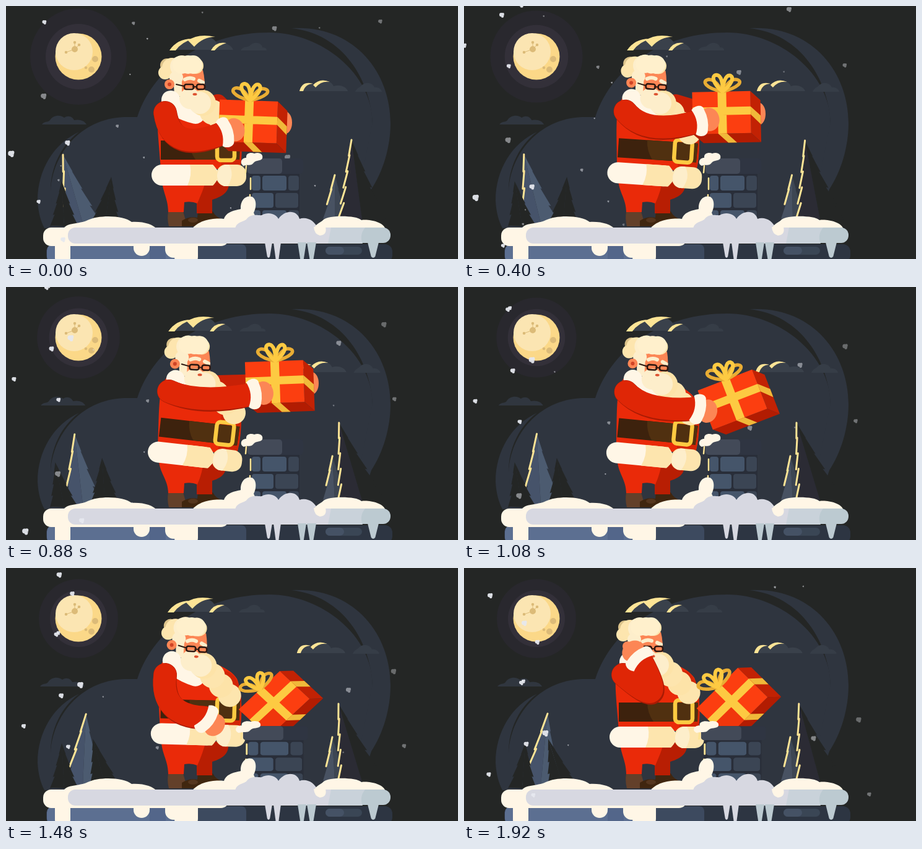
An HTML page with a canvas for the animation above (1960 ms loop, 730 px wide and 410 px high).

```html
<!DOCTYPE html>
<html lang="en">
<head>
<meta charset="utf-8">
<title>Winter rooftop</title>
<style>
html, body { margin: 0; width: 100%; height: 100%; overflow: hidden; background: #242625; }
canvas { display: block; }
</style>
</head>
<body>
<canvas id="stage" width="730" height="410"></canvas>
<script>
const g = document.getElementById('stage').getContext('2d');
const LOOP = 1960, STEP = 40;
const BG = '#242625', HILL = '#2f353f', CREAM = '#fff6e6', HAIR = '#fdeecb', WARM = '#fde5ae', GOLD = '#fdca42',
  RED = '#ea2a09', SLEEVE = '#df2606', DARKRED = '#b81e03', SKIN = '#fc8655', GLOW = '#fde496', ICE = '#d7d8e1';

const lerp = (a, b, u) => a + (b - a) * u;
const part = (t, a, b) => Math.min(1, Math.max(0, (t - a) / (b - a)));
const ramp = (t, a, b) => { const u = part(t, a, b); return u * u * (3 - 2 * u); };

// progress of each phase of the action, 0 to 1
const phases = t => ({
  dip: ramp(t, 0, 200),
  reach: ramp(t, 200, 560),
  wait: ramp(t, 600, 880),
  drop: part(t, 1000, 1120) ** 2,
  lower: ramp(t, 1000, 1240),
  fold: ramp(t, 1240, 1720),
  scratch: ramp(t, 1720, 1920)
});

function fill(d, color) { g.fillStyle = color; g.fill(new Path2D(d)); }
function line(d, color, w) {
  g.strokeStyle = color; g.lineWidth = w; g.lineCap = g.lineJoin = 'round';
  g.stroke(new Path2D(d));
}
function oval(x, y, rx, color, ry = rx) {
  g.fillStyle = color; g.beginPath(); g.ellipse(x, y, rx, ry, 0, 0, 7); g.fill();
}
function box(x, y, w, h, r, color) {
  g.fillStyle = color; g.beginPath(); g.roundRect(x, y, w, h, r); g.fill();
}
function frame(x, y, w, h, r, color, lw) {
  g.strokeStyle = color; g.lineWidth = lw; g.beginPath(); g.roundRect(x, y, w, h, r); g.stroke();
}
function group(draw) { g.save(); draw(); g.restore(); }
function turn(x, y, deg) { g.translate(x, y); g.rotate(deg * Math.PI / 180); g.translate(-x, -y); }

function sky(t) {
  g.fillStyle = BG; g.fillRect(0, 0, 730, 410);
  const halo = 1 - ramp(t, 0, 1240);
  oval(117, 82, 64 + 14 * halo, '#29282e');
  oval(117, 82, 46 + 7 * halo, '#333039');

  fill('M212 180C240 95 325 43 425 43C510 43 592 110 592 190L590 297L570 360H70L72 300C75 240 120 183 190 180Z', HILL);
  fill('M461 36C560 30 621 105 621 190C621 230 608 270 590 297L560 350L592 188C588 120 545 45 461 36Z', HILL);
  fill('M118 204C78 222 51 265 51 315C52 335 56 348 62 360H78L72 300C72 260 90 225 118 204Z', HILL);

  oval(117, 82, 37.5, '#fbd888');
  oval(110, 74, 30, '#fbe5b2');
  const crater = '#dcbb78';
  line('M97 75L111 70L118 63M111 70V59', crater, 1);
  line('M97 75h0M111 59h0M118 63h0M129 100h0', crater, 4.5);
  line('M111 70h0M144 86h0M138 103h0', crater, 10);
}

function clouds(t) {
  const u = t / LOOP;
  group(() => {
    g.translate(-4 * u, 0);
    fill('M58 192C62 186 68 189 71 185C76 176 89 176 94 181C101 176 108 180 110 185C119 183 127 186 130 192Z', '#30363f');
    fill('M268 71C276 58 288 54 299 57C309 46 333 46 340 60C352 57 364 63 367 71Z', '#3a414b');
    fill('M379 72C384 64 390 68 394 64C402 56 414 61 414 67C420 67 421 70 421 72Z', '#363d47');
    fill('M264 72Q277 52 303 53Q284 58 274 72ZM294 56Q310 44 338 50Q318 50 304 66ZM331 72Q339 57 356 60Q344 63 337 72Z', GLOW);
  });
  group(() => {
    g.translate(-5.5 * u, 0);
    fill('M474 138C478 127 488 121 497 127C506 117 525 119 529 130C540 126 551 132 552 138Z', '#3a414b');
    fill('M564 139C567 132 572 132 575 128C584 121 594 127 595 132C602 131 607 136 607 139Z', '#363d47');
    fill('M474 138Q478 121 496 126Q484 126 480 138ZM496 128Q507 116 523 123Q509 121 500 132Z', GLOW);
  });
}

// one jagged edge from the apex down; s is -1 for left, 1 for right
function edge(ax, ay, bx, by, w, n, s) {
  const pts = [[ax, ay]];
  for (let i = 1; i <= n; i++) {
    const u = i / n, c = lerp(ax, bx, u), y = lerp(ay, by, u);
    pts.push([c + s * w * u, y], [c + s * w * u * 0.83, y - 1]);
  }
  return pts;
}
function tree(ax, ay, bx, by, w, n, left, right, lit = 0) {
  const l = edge(ax, ay, bx, by, w, n, -1), r = edge(ax, ay, bx, by, w, n, 1);
  fill('M' + l.join('L') + `L${bx} ${by}Z`, left);
  fill('M' + r.join('L') + `L${bx} ${by}Z`, right);
  for (let i = 0; i < lit; i++) line(`M${l[2 * i]}L${l[2 * i + 1]}`, GLOW, 3);
}
function trees(t) {
  const wind = ramp(t, 0, 1920), gust = ramp(t, 0, 1000);
  tree(92 + 43 * wind, 241 - 5 * wind, 124, 352, 31, 4, '#46536a', '#4c5b70', 3);
  tree(90 - 11 * Math.sin(Math.PI * t / 1480), 284, 94, 357, 23, 4, BG, BG);
  tree(170 - 34 * wind, 277, 160, 353, 25, 4, BG, BG);
  tree(531 - 4 * gust, 274, 531, 345, 19, 3, '#485262', '#3d4653', 2);
  tree(558 - 21 * gust + 4 * ramp(t, 1600, LOOP), 217 + 3 * gust, 575, 346, 39, 5, '#2b2b34', BG, 5);
}

let seed = 11;
const rnd = () => (seed = seed * 16807 % 2147483647) / 2147483647;
// bright flakes drift close by on the left, faint ones fall everywhere
const FLAKES = Array.from({ length: 38 }, (_, i) => {
  const near = i % 3 === 0;
  return {
    near,
    x: near ? 110 * rnd() - 10 : 60 + 550 * rnd(),
    y: 700 * rnd() - 320,
    r: near ? 3 + 2.5 * rnd() : 1.2 + 4 * rnd() ** 2,
    a: near ? 0.95 : 0.35 + 0.3 * rnd()
  };
});
function snow(t, near) {
  for (const f of FLAKES) {
    if (f.near !== near) continue;
    const x = f.x + .026 * t, y = f.y + .178 * t, r = f.r;
    g.globalAlpha = f.a;
    g.fillStyle = '#e6e8ee';
    g.beginPath();
    g.arc(x - r * .2, y - r * .15, r * .75, 0, 7);
    g.arc(x + r * .45, y - r * .45, r * .5, 0, 7);
    g.arc(x + r * .25, y + r * .5, r * .5, 0, 7);
    g.fill();
  }
  g.globalAlpha = 1;
}

function legs(hip) {
  fill('M262 333H286L290 347L288 357H263Q260 345 262 333Z', '#63402a');
  fill('M284 348Q296 340 309 343L310 333H334Q339 343 351 346Q354 352 352 357H284Z', '#40260f');
  oval(302, 347, 8, '#55361e', 4);
  const l = 252 + hip, r = 360 + hip;
  fill(`M${l + 60} 280L308 320V336H333V314C352 308 ${r + 2} 300 ${r} 282Z`, DARKRED);
  fill(`M${l} 280C${l} 300 262 312 262 334H287L288 318Q300 316 309 320Q318 300 ${l + 72} 280Z`, RED);
}

function head() {
  oval(260, 96, 11, '#dcc38b');
  oval(257, 108, 11, WARM);
  oval(268, 100, 16, WARM);
  oval(282, 98, 17, HAIR);
  fill('M274 104H318Q322 120 321 142H278Z', SKIN);
  oval(275, 116, 11, HAIR);
  fill('M270 112H284V146H272Z', HAIR);
  oval(264, 127, 8, SKIN);
  oval(264, 127, 3, '#cf4426');
  oval(306, 97, 13, WARM);
  for (const x of [284, 294, 302]) oval(x, 95, 15, '#fff0cc');
}
function beard() {
  line('M266 152Q274 168 306 176', CREAM, 30);
  for (let i = 3; i >= 0; i--) oval(318 + 15 * i, 157 + 15 * i, 21 - .8 * i, i % 2 ? WARM : '#fde3a8');
  oval(297, 150, 17, HAIR);
  oval(313, 157, 18, HAIR);
  oval(305, 143, 3.5, '#dd5331', 2);
  line('M289 119Q296 115 303 118M312 121L318 124', HAIR, 6);
  line('M275 127L288 130M302 131H307', '#2c1811', 2);
  frame(288, 127, 15, 8, 3, '#2c1811', 2.6);
  frame(308, 127, 13, 8, 3, '#2c1811', 2.6);
}

function body(p, gift) {
  const dx = -5 * p.reach + 3 * p.lower + 2 * p.fold;
  const tilt = 6.5 * p.reach - 3.5 * p.lower - 3 * p.fold;
  const nod = -4 * p.wait + 9 * p.lower - 5 * p.fold;
  legs(dx);
  group(() => {
    g.translate(dx, 0);
    turn(308, 262, tilt);
    fill('M256 148C238 162 246 205 250 264H378C383 240 381 200 372 178C360 160 330 150 300 148Z', RED);
    fill('M345 168C364 160 376 182 379 205C381 230 380 245 378 264H348Z', '#d22506');
    g.translate(0, 8 * (p.scratch - p.fold));
    fill('M250 218H378L377 249H250Z', '#3d220d');
    fill('M296 218H378L377 249H306Q296 235 296 218Z', '#503010');
    frame(341, 214, 28, 36, 6, GOLD, 6.5);
    box(235, 257, 108, 34, 17, CREAM);
    fill('M297 257H334C344 266 344 283 334 291H293Q301 274 297 257Z', WARM);
    box(340, 257, 48, 35, 15, WARM);
    fill('M354 257H360Q370 273 358 292H352C337 286 337 263 354 257Z', HAIR);
  });
  if (p.drop < .1) {
    line(`M342 158L${gift.x - 18} ${gift.y + 2}`, '#c82106', 30);
    oval(gift.x + 60, gift.y + 2, 11, SKIN, 18);
  }
  group(() => {
    g.translate(dx, 0);
    turn(308, 262, tilt);
    turn(290, 150, nod);
    head();
    beard();
  });
}

function bow() {
  line('M0 0C-28 -6 -34 -18 -22 -20C-12 -20 -6 -10 0 0C6 -10 14 -22 24 -19C34 -16 26 -6 0 0', '#e9ad34', 5.5);
  line('M0 0C-16 -14 -18 -27 -9 -27C-1 -26 1 -12 0 0C1 -12 5 -28 13 -26C20 -22 14 -10 0 0', GOLD, 6);
}
function giftPose(t, p) {
  const landed = Math.max(0, t - 1120);
  return {
    x: 391 + 43 * p.reach - p.drop,
    y: 187 + 12 * p.dip - 45 * p.reach + 64 * p.drop,
    rot: 2 - 2 * p.dip - 2 * p.reach - 43 * p.drop,
    squash: .28 * ramp(landed, 0, 60) * Math.exp(-landed / 250)
  };
}
function present({ x, y, rot, squash }) {
  group(() => {
    g.translate(0, 257); g.scale(1, 1 - squash); g.translate(0, -257);
    turn(x, y, rot);
    g.translate(x, y);
    fill('M47 -34L63 -19V49L47 34Z', '#c22204');
    fill('M-47 34H47L63 49H-30Z', '#b21c02');
    fill('M47 -9L63 6V20L47 4ZM-6 34H8L24 49H10Z', '#f0b93a');
    fill('M-47 -34H47V34H-47Z', '#fc3e10');
    fill('M-47 4H-6V34H-47Z', '#f0360c');
    fill('M-6 -34H8V34H-6ZM-47 -9H47V4H-47Z', GOLD);
    g.translate(2, -34);
    turn(0, 0, -rot * .4);
    bow();
  });
}

function chimney(t) {
  const push = ramp(t, 1080, 1160);
  group(() => {
    g.translate(434, 350); g.scale(1 + .16 * push, 1 - .09 * push); g.translate(-434, -350);
    box(394, 268, 80, 90, 2, '#292e39');
    box(390, 247, 90, 25, 5, '#2f3542');
    box(390, 247, 56, 25, 5, '#434a58');
    for (let row = 0; row < 3; row++) {
      let x = 397;
      for (const w of row % 2 ? [35, 37] : [14, 39, 17]) {
        box(x, 275 + 28 * row, w, 24, 4, x > 430 ? '#3b4554' : '#45556a');
        x += w + 3;
      }
    }
    line('M395 279V297M388 259L387 270M394 306V312', GLOW, 2.5);
    fill('M384 259C377 256 379 246 388 246C387 238 396 237 401 239C409 236 416 240 414 247C411 252 404 249 400 254C396 260 390 256 384 259Z', CREAM);
  });
}

function drip(x, w, bottom) { box(x, 370, w, bottom - 370, w / 2, CREAM); }
function icicle(x, w, bottom, color) {
  fill(`M${x} 383H${x + w}L${x + w * .68} ${bottom}Q${x + w / 2} ${bottom + 4} ${x + w * .32} ${bottom}Z`, color);
}
function roof() {
  box(65, 386, 559, 30, 12, '#2d3542');
  box(66, 386, 240, 30, 10, '#5c6f91');
  box(290, 386, 98, 30, 8, '#3d4a5f');
  fill('M232 386H258V410H232Z', '#53668a');
  box(516, 390, 59, 13, 6.5, '#3a4655');
  box(516, 390, 30, 13, 6.5, '#455265');

  fill('M92 362C98 350 118 354 132 347C150 338 190 339 203 350C222 349 238 354 244 362Z', CREAM);
  fill('M300 362C310 347 335 343 352 345C356 333 370 331 379 329C378 314 388 306 397 309C406 313 404 328 400 335L412 362Z', CREAM);
  fill('M370 362C371 350 383 350 388 346C396 335 408 340 413 339C424 333 436 337 440 345C450 330 470 330 474 345C485 341 499 347 504 362Z', ICE);
  fill('M498 366C496 353 508 352 513 346C522 339 566 339 574 347C584 345 610 349 613 362Z', CREAM);

  box(60, 359, 300, 30, 13, CREAM);
  drip(79, 25, 420);
  drip(206, 26, 405);
  drip(257, 27, 408);
  drip(272, 38, 425);
  box(480, 359, 141, 25, 12, '#bccad1');
  box(100, 359, 470, 26, 12, ICE);
  fill('M525 359H580Q570 372 576 385H520Z', '#c9d2da');
  fill('M497 358H516Q519 371 507 372Q498 370 497 358Z', CREAM);
  icicle(418, 12, 406, ICE);
  icicle(432, 12, 412, ICE);
  icicle(471, 14, 412, '#bccad1');
  icicle(486, 15, 412, '#bccad1');
  icicle(584, 18, 406, '#bccad1');
}

// elbow control point, wrist, hand angle
const HOLD = [266, 240, 350, 206, -16], REACH = [313, 190, 396, 174, -6], DOWN = [236, 240, 309, 263, 62],
  FOLD = [260, 236, 332, 222, 10], SCRATCH = [332, 238, 286, 150, -130];
const blend = (a, b, u) => a.map((v, i) => lerp(v, b[i], u));

function arm(p) {
  let pose = blend(HOLD, REACH, p.reach);
  pose = blend(pose, DOWN, p.lower);
  pose = blend(pose, FOLD, p.fold);
  const [cx, cy, wx, wy, deg] = blend(pose, SCRATCH, p.scratch);
  const sx = 257 + 6 * (p.reach - p.lower), sy = 173 - 4 * (p.reach - p.lower);
  line(`M${sx} ${sy}Q${cx + 3} ${cy + 4} ${wx} ${wy}`, '#a91b04', 38);
  line(`M${sx} ${sy}Q${cx} ${cy} ${wx} ${wy}`, SLEEVE, 37);
  group(() => {
    g.translate(wx, wy);
    turn(0, 0, deg);
    oval(20, 0, 16, SKIN, 19);
    fill('M-6 -20C2 -28 14 -25 14 -18Q20 0 14 18C12 26 0 27 -6 20Q4 0 -6 -20Z', CREAM);
  });
}

function draw() {
  const t = Math.floor(performance.now() % LOOP / STEP) * STEP;
  const p = phases(t), gift = giftPose(t, p);
  sky(t);
  clouds(t);
  trees(t);
  snow(t, false);
  body(p, gift);
  present(gift);
  chimney(t);
  roof();
  arm(p);
  snow(t, true);
  requestAnimationFrame(draw);
}
draw();
</script>
</body>
</html>
```
